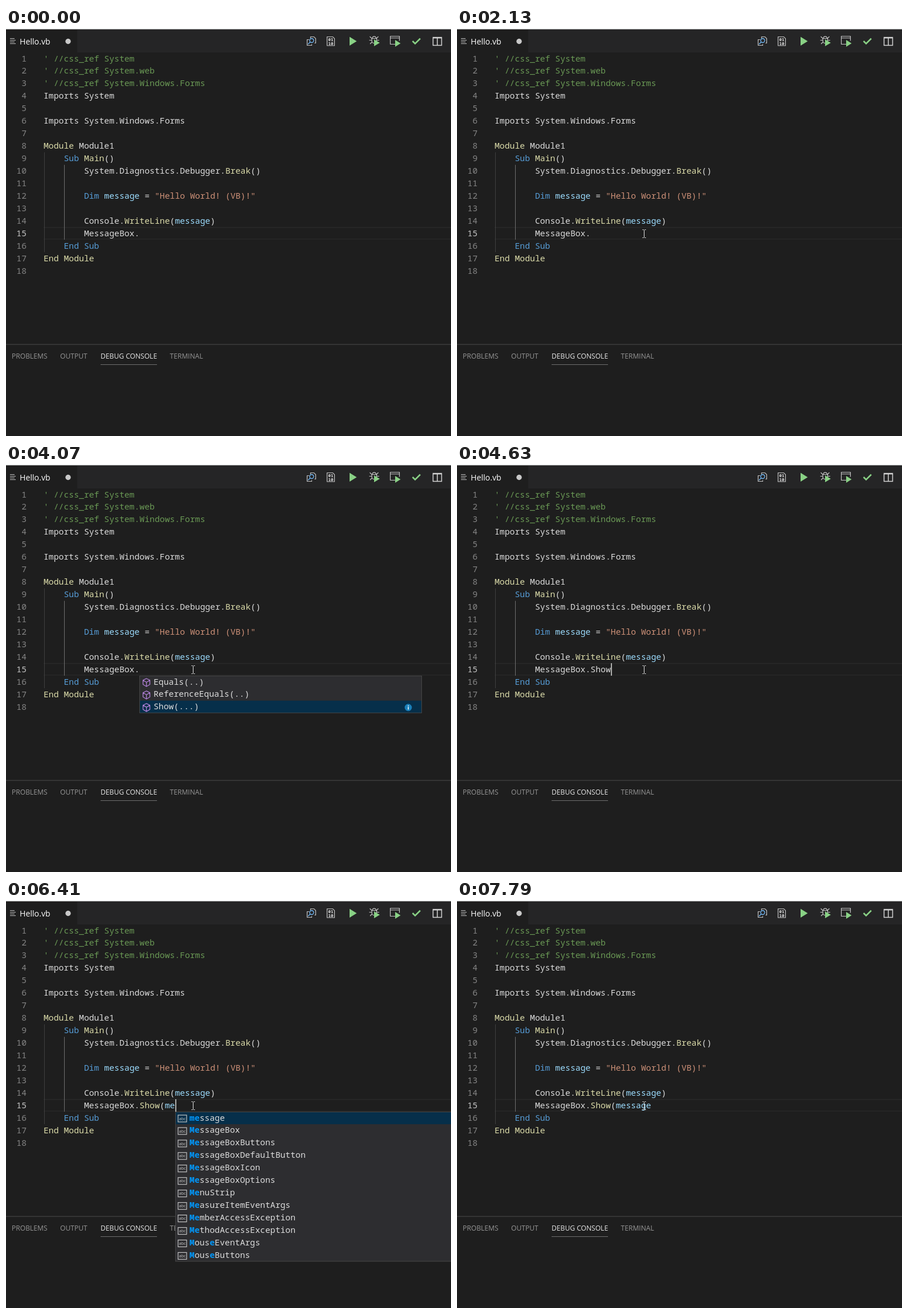
An HTML page that plays this animation: 781 px wide and 717 px high, repeating every 8 s.

```html
<!DOCTYPE html>
<html lang="en">
<head>
<meta charset="utf-8">
<title>Code completion</title>
<style>
  html, body { margin: 0; width: 100%; height: 100%; overflow: hidden; background: #1e1e1e; }
  svg { display: block; }
  text { white-space: pre; fill: #dcdcdc; }
  .code text { font: 500 14.78px "Noto Sans Mono", "DejaVu Sans Mono", monospace; }
  .ui text { font: 500 12.1px "Open Sans", "Noto Sans", sans-serif; fill: #969696; }
  .ui .file { font-size: 14.2px; fill: #fff; }
  .ui .on { fill: #e7e7e7; }
  .ui .bits { font: bold 7.5px "Noto Sans Mono", monospace; fill: #e0e0e0; }
  .code .num { font-weight: 400; fill: #858585; text-anchor: end; }
  .code .now { fill: #c6c6c6; }
  .code .abc { font: 7px "Noto Sans", sans-serif; fill: #c5c5c5; text-anchor: middle; }
  .comment { fill: #6a9955; }
  .string { fill: #ce9178; }
  .word { fill: #569cd6; }
  .call { fill: #dcdcaa; }
  .name { fill: #9cdcfe; }
  .hit { fill: #0097fb; font-weight: bold; }
  .line { fill: none; stroke: #c5c5c5; stroke-width: 1.2; }
  .go { fill: #89d185; }
</style>
</head>
<body>
<svg width="781" height="717" viewBox="0 0 781 717">
  <rect width="781" height="717" fill="#1e1e1e"/>
  <rect width="781" height="43" fill="#252526"/>
  <rect width="125" height="43" fill="#1e1e1e"/>
  <rect width="781" height="2" fill="#f4f6f6"/>
  <rect y="2" width="781" height="1" fill="#555"/>

  <g class="ui">
    <path class="line" d="M7 18.5h8M7 21.5h10M7 24.5h8M7 27.5h10"/>
    <text class="file" x="24" y="29">Hello.vb</text>
    <circle cx="109" cy="23.5" r="4.7" fill="#c8c8c8"/>

    <path class="line" d="M534.5 18v-2.500h6l3 3v8h-2M532 20.500h-3.500v10h8v-2"/>
    <g fill="none" stroke="#75beff" stroke-width="1.3"><circle cx="536.5" cy="22" r="3.500"/><path d="M534 24.500l-4 4"/></g>

    <path class="line" d="M563.5 15.500h10l3 3v12.500h-13z"/>
    <text class="bits" x="565.500" y="23">01</text>
    <text class="bits" x="565.500" y="29.500">10</text>

    <path class="go" d="M603 15.500l12.500 7.700-12.500 7.700z"/>

    <path class="line" d="M643 18a3.200 3.200 0 0 1 6.400 0M642 18.500h8.500v4a4.200 4.200 0 0 1-8.500 0zM638.500 15l3.500 3.500M653.500 15l-3.500 3.500M637.500 21.500h4M651 21.500h4M639 28l3.500-3.500"/>
    <path class="go" d="M646 20l10 6-10 6z"/>

    <path class="line" d="M683 28.500h-8.500v-14h16v8M674.500 17.500h16"/>
    <path class="go" d="M683 21l9.500 6-9.500 6z"/>

    <path d="M713.500 23l4.500 4.500 9-9" fill="none" stroke="#89d185" stroke-width="2.600"/>
    <path class="line" d="M749.500 16.500h15v14h-15zM757 17v13M749 17.500h16" style="stroke-width:1.500;stroke:#d4d4d4"/>

    <rect y="555.500" width="781" height="1.200" fill="#444"/>
    <text x="10" y="581">PROBLEMS</text>
    <text x="95" y="581">OUTPUT</text>
    <text x="166" y="581" class="on">DEBUG CONSOLE</text>
    <text x="287.500" y="581" id="terminal">TERMINAL</text>
    <rect x="166" y="591" width="99" height="1" fill="#707070"/>
  </g>

  <path d="M66 350.500H781M66 371H781" stroke="#292929" stroke-width="1.500"/>
  <path d="M67.500 218.500V394" stroke="#404040"/>
  <path d="M102.500 240.500V372" stroke="#707070"/>
  <g class="code" id="lines"></g>
  <g class="code" id="live"></g>
</svg>
<script>
const ROW = 21.95, TOP = 43, LEFT = 66, POPUP_TOP = 372, LOOP = 8000;
const $ = id => document.getElementById(id);

const program = [
  "' //css_ref System",
  "' //css_ref System.web",
  "' //css_ref System.Windows.Forms",
  'Imports System',
  '',
  'Imports System.Windows.Forms',
  '',
  'Module Module1',
  '    Sub Main()',
  '        System.Diagnostics.Debugger.Break()',
  '',
  '        Dim message = "Hello World! (VB)!"',
  '',
  '        Console.WriteLine(message)',
  '',
  '    End Sub',
  'End Module',
  ''
];

const methods = ['Equals(..)', 'ReferenceEquals(..)', 'Show(...)'];
// Brackets mark the letters that can match the typed word.
const words = [
  '[mes]sage', '[Mes]sageBox', '[Mes]sageBoxButtons', '[Mes]sageBoxDefaultButton',
  '[Mes]sageBoxIcon', '[Mes]sageBoxOptions', '[Me]nu[S]trip', '[Me]a[s]ureItemEventArgs',
  '[Me]mberAcce[s]sException', '[Me]thodAcce[s]sException', '[M]ou[se]EventArgs', '[M]ou[se]Buttons'
];

// Each entry changes only the properties it names.
const steps = [
  [0, { text: '', caret: 0, popup: null, hover: false, shape: '', x: 0, y: 0 }],
  [400, { shape: 'arrow', x: 441, y: 609 }],
  [520, { x: 394, y: 593 }],
  [640, { x: 352, y: 580 }],
  [780, { shape: 'hand', x: 354, y: 585, hover: true }],
  [900, { shape: 'beam', x: 391.5, y: 476.5, hover: false }],
  [1050, { x: 393.5, y: 446.5 }],
  [1180, { x: 371.5, y: 413.5 }],
  [1330, { x: 344.5, y: 383.5 }],
  [1450, { x: 328.5, y: 362.5 }],
  [1600, { y: 361.5, caret: 234 }],
  [2130, { caret: 0 }],
  [2690, { caret: 234, popup: { x: 234, list: 'methods' } }],
  [3120, { caret: 0 }],
  [3650, { caret: 234 }],
  [4070, { caret: 0 }],
  [4630, { caret: 270, text: 'Show', popup: null }],
  [5180, { caret: 0 }],
  [5710, { caret: 270 }],
  [5860, { caret: 279, text: 'Show(' }],
  [6260, { caret: 288, text: 'Show(m' }],
  [6410, { caret: 297, text: 'Show(me', popup: { x: 297, query: 'me' } }],
  [6560, { caret: 306, text: 'Show(mes' }],
  [6680, { popup: { x: 306, query: 'mes' } }],
  [7110, { caret: 0 }],
  [7260, { caret: 341, text: 'Show(message', popup: null }],
  [7790, { caret: 0 }]
];

const span = (kind, s) => `<tspan class="${kind}">${s}</tspan>`;
const text = (x, y, s, kind = '') => `<text x="${x}" y="${y}" class="${kind}">${s}</text>`;
const rect = (x, y, w, h, fill) => `<rect x="${x}" y="${y}" width="${w}" height="${h}" fill="${fill}"/>`;
const baseline = (row, top = TOP) => Math.round(top + row * ROW + 15.5);

const syntax = /(^'.*)|(".*?")|(\bEnd Sub\b|\bSub\b|\bDim\b)|(\bEnd\b|\bModule\b|\w+(?=\())|(\bm\w*)/g;
const kinds = ['comment', 'string', 'word', 'call', 'name'];
const paint = s => s.replace(syntax, (all, ...groups) =>
  span(kinds[groups.findIndex(g => g !== undefined)], all));

function methodIcon(x, y) {
  return `<path transform="translate(${x} ${y})" fill="none" stroke="#b180d7" stroke-width="1.3"
    d="M0-7L6-4V3.500L0 7-6 3.500V-4zM-6-4L0-.5 6-4M0-.5V7"/>`;
}

function wordIcon(x, y) {
  return `<rect class="line" x="${x - 7.5}" y="${y - 6}" width="15" height="12"/>` + text(x, y + 2.6, 'abc', 'abc');
}

function popup({ x, list, query }) {
  const items = list ? methods : words;
  const picked = list ? 2 : 0, width = list ? 496 : 560;
  const height = items.length * ROW;
  let out = rect(x, POPUP_TOP, width, height, '#2d2d30');
  items.forEach((item, i) => {
    const top = POPUP_TOP + i * ROW, mid = top + 12;
    if (i === picked) out += rect(x + 1, top, width - 2, ROW, '#062f4a');
    const label = list ? item : item.replace(/\[(.*?)\]/g, (_, part) =>
      [...part].map(c => query.includes(c.toLowerCase()) ? span('hit', c) : c).join(''));
    out += (list ? methodIcon : wordIcon)(x + 12.5, mid) + text(x + 25, baseline(i, POPUP_TOP), label);
    if (list && i === picked) {
      out += `<circle cx="706" cy="${mid}" r="6.3" fill="#1a7fb8"/>` +
        rect(705.3, mid - 1.2, 1.5, 4.8, '#fff') + rect(705.3, mid - 3.8, 1.5, 1.5, '#fff');
    }
  });
  return out + `<rect x="${x + .5}" y="${POPUP_TOP + .5}" width="${width - 1}" height="${height - 1}" fill="none" stroke="#454545"/>`;
}

const pointers = {
  arrow: '<path d="M.5.5V16l3.500-3.300 2.500 5.800 2.500-1-2.500-5.500h5z" fill="#fff" stroke="#000"/>',
  hand: '<path d="M-1 1.500q1.500-2 3 0v6l7 1.500q2 .5 2 2.500v4l-2 5.500H1l-5-8q0-2 3 0z" fill="#fff" stroke="#000"/>',
  beam: '<path d="M-3-7h2l1 1 1-1h2M0-6V6M-3 7h2l1-1 1 1h2" fill="none" stroke="#e8e8e8"/>'
};

function draw(s) {
  $('terminal').setAttribute('class', s.hover ? 'on' : '');
  $('live').innerHTML =
    text(LEFT, baseline(14), paint('        MessageBox.' + s.text)) +
    (s.caret ? rect(s.caret, 350, 2, 22, '#aeafad') : '') +
    (s.popup ? popup(s.popup) : '') +
    (s.shape ? `<g transform="translate(${s.x} ${s.y})">${pointers[s.shape]}</g>` : '');
}

$('lines').innerHTML = program.map((line, i) =>
  text(36, baseline(i), i + 1, i === 14 ? 'num now' : 'num') + text(LEFT, baseline(i), paint(line))).join('');

let shown = -1;
function tick() {
  const t = performance.now() % LOOP;
  const past = steps.filter(([at]) => at <= t);
  if (past.length !== shown) {
    shown = past.length;
    draw(Object.assign({}, ...past.map(([, change]) => change)));
  }
  requestAnimationFrame(tick);
}
tick();
</script>
</body>
</html>
```
